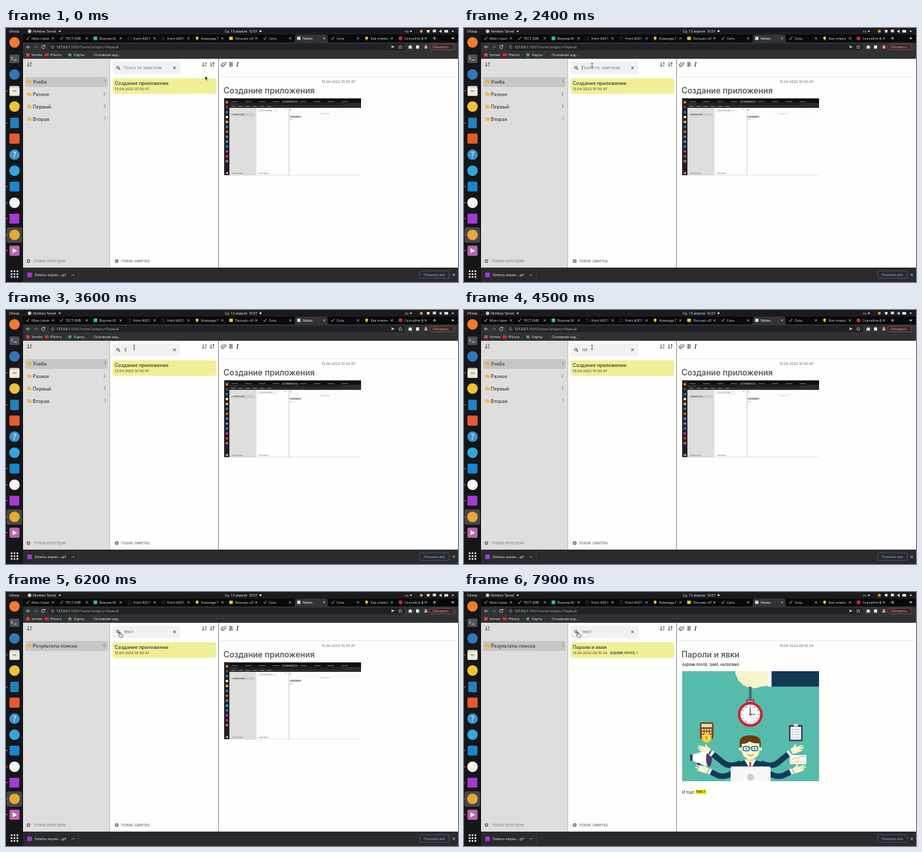
An HTML page for the animation above (8 s loop, 690 by 388 pixels).

```html
<!DOCTYPE html>
<html lang="ru">
<head>
<meta charset="utf-8">
<title>Notes</title>
<style>
html, body { margin: 0; width: 100%; height: 100%; overflow: hidden; background: #1b1b1d; }
svg { display: block; width: 100vw; height: 100vh; }
text { white-space: pre; }
.app { font-family: Inter, "Noto Sans", sans-serif; }
.ui { font-family: "Noto Sans", "Open Sans", sans-serif; }
</style>
</head>
<body>
<svg id="stage" viewBox="0 0 690 388"></svg>
<script>
const LOOP = 8000;
const rect = (x, y, w, h, fill, r = 0, extra = '') =>
  `<rect x="${x}" y="${y}" width="${w}" height="${h}" rx="${r}" fill="${fill}" ${extra}/>`;
const circle = (x, y, r, fill, extra = '') => `<circle cx="${x}" cy="${y}" r="${r}" fill="${fill}" ${extra}/>`;
const shape = (d, fill, extra = '') => `<path d="${d}" fill="${fill}" ${extra}/>`;
const line = (d, color, w = 1, cap = 'round') =>
  `<path d="${d}" fill="none" stroke="${color}" stroke-width="${w}" stroke-linecap="${cap}" stroke-linejoin="round"/>`;
// y is the middle of the capitals
const label = (cls, x, y, size, fill, str, extra = '') =>
  `<text class="${cls}" x="${x}" y="${(y + size * .36).toFixed(2)}" font-size="${size}" fill="${fill}" ${extra}>${str}</text>`;
const app = (...a) => label('app', ...a);
const ui = (...a) => label('ui', ...a);
const group = (id, body) => `<g id="${id}">${body}</g>`;
const cross = (x, y, r, color, w) => line(`M${x - r} ${y - r}l${2 * r} ${2 * r}m0 ${-2 * r}l${-2 * r} ${2 * r}`, color, w);
const SEMI = 'font-weight="600"', MID = 'text-anchor="middle"', END = 'text-anchor="end"';

function topBar() {
  return rect(0, 0, 690, 10, '#1b1b1d') + ui(4.5, 5, 5.2, '#e4e4e4', 'Обзор') +
    circle(36, 5, 2.7, '#c9c9c9') + ui(41, 5, 5.3, '#e4e4e4', 'Nimbex Tarvel') +
    shape('M80 4h4l-2 2.4z', '#ddd') + ui(334, 5, 5.1, '#e8e8e8', 'Ср, 13 апреля  10:57') +
    circle(388.5, 4.8, 1.5, '#eee') + ui(609, 5, 5.2, '#ddd', 'ru') + shape('M616 4h4l-2 2.4z', '#ddd') +
    circle(634, 5, 2.3, '#e9902c') + shape('M642 3h5l-1 4h-3z', '#ddd') + rect(651.5, 2.5, 5, 4, '#ddd', .6) +
    shape('M661.5 4h1.5l2-2v6l-2-2h-1.5z', '#ddd') + rect(669, 3, 6, 4, '#ddd', .7) + shape('M680 4h4l-2 2.4z', '#ddd');
}

function tabs() {
  const names = ['Моя стран', 'ТЕСТ (МВ', 'Ворлик.М', 'front #201', 'front #201', 'Команда Г', 'Письмо «И',
    'Сеть', 'Notes', 'Сеть', 'Как отмен', 'Скачайте ф'];
  const kinds = 'vvsoobmvnvbr';
  const icons = {
    v: x => line(`M${x - 2} 16l1.5 1.7l2.5-4`, '#cfd2d6', .8),
    s: x => rect(x - 2.8, 13, 5.6, 5.6, '#27c3a0', .6),
    o: x => circle(x, 15.8, 2.4, 'none', 'stroke="#45484c" stroke-width=".7"'),
    b: x => circle(x, 15.2, 2.2, '#f5c43a') + rect(x - 1, 17, 2, 1.6, '#d9a42c'),
    m: x => rect(x - 2.8, 13.2, 5.6, 5, '#f4c531', .4),
    n: x => rect(x - 2.5, 13.2, 5, 5, '#c9dff5', .4),
    r: x => circle(x, 15.8, 3, '#d02637')
  };
  let out = rect(26, 10, 664, 12, '#08090a') + shape('M438 22q3 0 3-3v-6q0-3 3-3h44q3 0 3 3v6q0 3 3 3z', '#323336');
  names.forEach((name, i) => {
    const x = 33 + i * 51.75;
    out += icons[kinds[i]](x) + ui(x + 6, 15.8, 5.3, i === 8 ? '#fff' : '#c9ccd1', name) +
      cross(x + 38.6, 15.8, 1.35, '#d5d7da', .75);
  });
  return out + line('M652 15.8h4.4m-2.2-2.2v4.4', '#e6e6e6', .8) + shape('M679.5 14.8h5l-2.5 2.8z', '#ddd');
}

function toolbar() {
  return rect(26, 22, 664, 25, '#303134') + rect(65, 24, 544, 10, '#202124', 5) +
    line('M36.5 29h-5m2.2-2.2l-2.2 2.2l2.2 2.2', '#e4e4e4', .8) + line('M43 29h5m-2.2-2.2l2.2 2.2l-2.2 2.2', '#7b7d80', .8) +
    line('M59 27.5a2.5 2.5 0 1 0 .3 2.3m-.2-3.6v1.6h-1.6', '#e4e4e4', .8) +
    circle(71, 29, 2.3, 'none', 'stroke="#b6b8bb" stroke-width=".6"') + line('M71 28.7v1.3', '#b6b8bb', .6) +
    ui(77, 28.7, 5, '#9aa0a6', '<tspan fill="#f0f0f0">127.0.0.1</tspan>:5500/?nameCategory=Первый') +
    shape('M588 26.5l5.5 2.3l-5.5 2.3l1-2.3z', '#ccc') +
    shape('M602 26l.9 2h2l-1.6 1.3l.7 2.1l-2-1.2l-2 1.2l.7-2.1l-1.6-1.3h2z', 'none', 'stroke="#ccc" stroke-width=".6"') +
    shape('M614.5 27.3h1.6a1 1 0 0 1 2 0h1.6v4.2h-5.2z', '#ddd') + rect(626, 26.5, 4.6, 5, '#eee', .6) +
    circle(641, 29, 3.2, '#784a42') + circle(641, 27.8, 1.2, '#e2c1ae') + shape('M638.8 31a2.2 2 0 0 1 4.4 0z', '#e2c1ae') +
    rect(646.7, 24.7, 40, 8.6, '#35292b', 4.3, 'stroke="#b95b56" stroke-width=".6"') +
    ui(651, 28.8, 5.1, '#f28b82', 'Обновить') + [27, 29, 31].map(y => circle(683, y, .5, '#f28b82')).join('') +
    rect(31, 38.5, 5, 5, '#dc4438', .5) + ui(39, 41, 5.2, '#e0e0e0', 'Vomex') +
    rect(59, 38.7, 6.4, 4.6, '#e12a25', 1) + ui(68, 41, 5.2, '#e0e0e0', 'Plivora') +
    circle(97.5, 41, 2.6, '#3aa757') + ui(104, 41, 5.2, '#e0e0e0', 'Карты') + ui(134, 41, 5.4, '#e0e0e0', 'Основная зад…');
}

function dock() {
  const dots = [96, 145, 242, 267, 291, 316, 340];
  return rect(0, 10, 26, 378, '#151618') + rect(1, 304.5, 23.5, 23.5, '#46484c', 3) +
    circle(13, 22, 8, '#f57a2c') +
    rect(5.5, 40.5, 15, 13, '#4a5259', 1.5) + line('M8 44l2.3 2l-2.3 2m4 1h4', '#e4e8ea', .9) +
    circle(13, 71, 8, '#2f78bb') +
    rect(5.5, 88.5, 15, 15, '#d8d2c4', 1.5) + rect(5.5, 91, 15, 12.5, '#f1ece0', 1.5) + rect(10, 95, 6, 2.5, '#b6aa94', .6) +
    circle(13, 120, 8, '#f0c332') + rect(6.5, 137, 13, 16, '#2182bd', 1) +
    rect(5.2, 161.2, 15.6, 15.6, '#e95a2b', 2) +
    circle(13, 193.5, 8, '#3e93ce') + ui(13, 193.5, 12, '#fff', '?', MID) +
    circle(13, 218, 8, '#32a6dc') + rect(5.5, 234.7, 15, 15, '#1787d0', 2) +
    circle(13, 267, 8, '#f6f4f4') + rect(5.3, 283.7, 15, 15, '#a43ad5', 1) +
    circle(13, 316, 8, '#e6a932') +
    rect(5.3, 332.5, 15.4, 15.4, '#b964ae', 2) + shape('M10 336.5l7 3.8l-7 3.8z', '#fff') +
    dots.map(y => circle(1.5, y, 1, '#e95420')).join('') +
    [0, 1, 2].map(r => [0, 1, 2].map(c => rect(7.3 + c * 4.4, 370.3 + r * 4.4, 2.5, 2.5, '#f1f1f1', .5)).join('')).join('');
}

function downloads() {
  return rect(26, 366, 664, 22, '#292a2d') + rect(32.5, 373.5, 7, 7, '#a43ad5', .5) +
    ui(43.5, 377, 5.4, '#e4e4e4', 'Запись-экран….gif') + line('M100.5 378l1.8-1.8l1.8 1.8', '#c9c9c9', .8) +
    rect(110.2, 369, .6, 16, '#4b4c50') + rect(631.5, 371, 45, 11.5, 'none', 1.5, 'stroke="#666a70" stroke-width=".6"') +
    ui(654, 376.8, 5, '#8ab4f8', 'Показать все', MID) + cross(683.5, 377, 1.5, '#ddd', .8);
}

const sortIcon = (x, letters) => line(`M${x - 2} 52.5v6m-1.4-1.6l1.4 1.6l1.4-1.6`, '#444', .9) +
  (letters ? app(x + .4, 53.4, 4, '#444', 'A', SEMI) + app(x + .4, 57.6, 4, '#444', 'Z', SEMI)
    : line(`M${x + 1.8} 58.5v-6m-1.4 1.6l1.4-1.6l1.4 1.6`, '#444', .9));
const plus = (x, y, color) => circle(x, y, 2.7, color) + line(`M${x - 1.5} ${y}h3m-1.5-1.5v3`, '#f4f4f4', .8);
const category = (y, name, count, extra = '') =>
  shape(`M32.5 ${y - 2}q0-.6.6-.6h2l.8.9h2.4v1h-4.6l-1.2 3z`, '#e9a71c') + shape(`M34 ${y - .3}h6l-1.5 2.9h-6z`, '#f6b91f') +
  app(41, y, 7.1, '#4a4a4a', name, SEMI) + app(152, y, 5.8, '#666', count, END + extra);

function layout() {
  return rect(26, 47, 132.7, 319, '#dededd') + rect(158.7, 47, 531.3, 319, '#fefefd') + rect(324, 47, 1, 319, '#8d8d8d') +
    rect(29, 75, 126.5, 15, '#c6c6c5', 3) + sortIcon(36, true) + sortIcon(303, true) + sortIcon(315, false) +
    plus(34.2, 356, '#555') + app(43, 356, 5.9, '#858585', 'Новая категория') +
    plus(169, 356, '#555') + app(176, 356, 5.9, '#666', 'Новая заметка') +
    line('M334.5 54.5l-2.8 2.8a1 1 0 0 1-1.5-1.5l3-3a1.8 1.8 0 0 1 2.5 2.5l-3.4 3.4a2.6 2.6 0 0 1-3.6-3.6l2.4-2.4', '#444', .9) +
    `<text x="340.5" y="58.8" font-family="Noto Serif, serif" font-size="8.6" font-weight="700" fill="#444">B</text>` +
    `<text x="351.5" y="58.8" font-family="Noto Serif, serif" font-size="8.6" font-style="italic" font-weight="600" fill="#444">I</text>` +
    rect(328, 74, 359, .7, '#dcdcdc') + rect(162.8, 76.8, 158, 24, '#f1ef95', 4) +
    rect(162.8, 51.2, 103.2, 19.5, '#f1f1f0', 3) +
    circle(170.7, 60.3, 1.8, 'none', 'stroke="#333" stroke-width="1"') + line('M172.2 61.8l1.6 1.6', '#333', 1.1) +
    cross(257.2, 60.9, 1.5, '#333', 1);
}

const note = (title, date) => app(166, 84.2, 7.2, '#4d4a38', title, SEMI) + app(166, 93.2, 5.4, '#5b583f', date, 'font-weight="500"') +
  app(507.5, 81.8, 5.4, '#666', date, MID) + app(332, 96, 12.4, '#4a4a4a', title, 'font-weight="500"');

function screenshot() {
  let out = rect(333, 107.5, 209, 117.5, '#fdfdfd') + rect(333, 107.5, 209, 14.5, '#0d0e10') + rect(333, 107.5, 8.3, 117.5, '#241d22') +
    rect(341.3, 122, 40.5, 103, '#dededd') + rect(431.7, 122, .5, 103, '#999') + rect(381.8, 122, .4, 103, '#ccc') +
    rect(421, 111, 25, 3, '#46474b', .8) + rect(341.3, 114.3, 200.7, 7.5, '#2b2c2f') + rect(354, 115, 160, 3, '#1d1e21', 1.5);
  for (let i = 0; i < 9; i++) out += rect(344 + i * 21, 112, 10, .8, '#8a8c90');
  for (let i = 0; i < 6; i++) out += rect(344 + i * 11, 119.5, 6, .7, '#aaa');
  ['#f57a2c', '#4a5259', '#2f78bb', '#f1ece0', '#f0c332', '#2182bd', '#e95a2b', '#3e93ce', '#32a6dc', '#1787d0', '#a43ad5', '#ec2836', '#b964ae']
    .forEach((c, i) => { out += circle(337.2, 113.5 + i * 7.5, 2.1, c); });
  for (let i = 0; i < 3; i++) out += rect(335.6 + i * 1.3, 220, .8, 3, '#ddd');
  return out + rect(343, 130.4, 37, 4, '#cbcbca', .7) + app(346, 132.4, 2.1, '#555', 'Новая категория', SEMI) +
    rect(383.5, 124, 31, 5, '#f1f1f0', .8) + app(387, 126.4, 2, '#888', 'Поиск по заметкам') +
    app(425, 124.5, 2.4, '#555', '↓↑') + app(433.5, 124.6, 2.6, '#444', 'B', SEMI) +
    rect(432, 128.5, 109, .3, '#ddd') + app(487, 131, 1.8, '#888', '13.04.2022 10:40', MID) +
    app(433, 135.4, 3.7, '#444', 'Название', SEMI) + app(433, 140, 2, '#888', 'Текст') +
    app(343, 222.3, 2, '#666', '+ Новая категория') + app(384, 222.3, 2, '#666', '+ Новая заметка') +
    rect(333, 224.7, 209, .4, '#bbb');
}

function illustration() {
  const skin = '#fbf3cb', shade = '#e9dfa9', navy = '#123a57', ink = '#28323a', red = '#d3202f', purple = '#4c3a70';
  const hand = (x, y) => shape(`M${x + 4} ${y - 3}q-3-3-5-3q-1-4-4-5q0 3 1 5q-5-2-11-3l-1 1l6 3l-7-1l0 1.5l7 2.5l-5 0l1 1.5q7 3 14 5z`, skin);
  // one side of arms, mirrored for the other
  const arms = line('M422 261q-17 8-27-1l-16-13', navy, 8.5, 'butt') + line('M416 273q-17 12-29 7l-12-6', navy, 8.5, 'butt') +
    line('M380 248l-3-2.5M377 275l-3.5-1.6', '#fff', 9, 'butt') + hand(373, 243) + hand(370, 273);
  let out = rect(333, 121, 209, 168, '#55bbaa') +
    shape('M414 121h52v22q-12 1-18 3q-7 3-11-2q-4 3-8-1q-4 0-6-5q-5-1-5-6q-4-5-4-11z', skin) +
    line('M421 133q8 1 12-3m-8 8q8 1 12-4m-5 8q7 0 9-5', shade, .8) +
    rect(464, 121, 6, 23.5, '#f6f8fa') + rect(469.5, 121, 72.5, 23.5, navy);
  for (let i = 0; i < 5; i++) out += rect(435.8, 145 + i * 4, 2.6, 4, 'none', 1.3, `stroke="${ink}" stroke-width="1"`);
  out += rect(431.5, 164.5, 11, 7, 'none', 1.5, `stroke="${red}" stroke-width="1.8"`) +
    circle(437, 187, 17, '#fff', `stroke="${red}" stroke-width="4"`);
  for (let a = 0; a < 360; a += 30) out += rect(436.6, 173, .8, 2.4, ink, 0, `transform="rotate(${a} 437 187)"`);
  out += line('M437 177v10h7', ink, 1.2) + circle(437, 187, 1.8, red) +
    rect(360, 199, 21, 25, '#7d4a20', 2) + rect(362.5, 201.5, 16, 5, '#f0dfbc');
  for (let i = 0; i < 12; i++) out += rect(363 + i % 4 * 4, 209 + (i / 4 | 0) * 4.5, 3, 2.8, '#ecc99a');
  out += circle(370.5, 223, 7.5, '#efc028') + circle(370.5, 223, 5.6, '#fbe056') + app(370.5, 223, 7, '#b98a17', '$', SEMI + ' ' + MID) +
    rect(496, 203, 21, 25, purple, 1.5) + rect(498.5, 206, 16, 19.5, '#fff') + rect(503, 201.5, 7, 4, '#dddde2', 1);
  for (let i = 0; i < 4; i++) out += rect(500.5, 209 + i * 4, 1.7, 1.7, '#4faf9f') + rect(504, 209.4 + i * 4, 8, .9, '#8d96a2');
  out += rect(497.5, 249, 25, 14, '#f8fafb', .6);
  for (let i = 0; i < 5; i++) out += rect(500.5 + i * 4.3, 259 - i % 3, 2, 2 + i % 3, '#e9cf6a');
  out += line('M500 257l5-4l4 2l5-4l6 0', '#d9a62c', .9) +
    rect(345, 248, 5, 10, purple, 1) + rect(356, 258, 5, 10, purple, 1) +
    shape('M349 248l23-6v24l-23-8z', '#fff') + `<ellipse cx="374" cy="254" rx="4.5" ry="13" fill="${purple}"/>` +
    arms + `<g transform="matrix(-1 0 0 1 875 0)">${arms}</g>` +
    shape('M409 289v-17q0-11 16-14l12-3l12 3q16 3 16 14v17z', navy) + shape('M428 256h18l-9 16z', '#fff') +
    rect(431.5, 246, 11, 13, shade, 4) + shape('M435 260h4l-1 3l2 7h-6l2-7z', red) +
    shape('M421 234q-3-15 16-15q18 0 16 15l-1 6h-30z', '#693c12') +
    circle(422.5, 240, 2.7, skin) + circle(452, 240, 2.7, skin) +
    shape('M424 232q8 0 12-4q6 4 15 3v10q0 13-13.8 14q-13.2-1-13.2-14z', skin) +
    [426, 439].map(x => rect(x, 236, 9.5, 6.5, '#dff3ee', 2.4, 'stroke="#176b78" stroke-width="1.4"')).join('') +
    line('M435.5 238h3.5', '#176b78', 1.2) +
    circle(431, 239.2, 1, ink) + circle(443.5, 239.2, 1, ink) + line('M433 248.5q4.5 3 9 0', '#a64f42', 1) +
    shape('M407 289v-20q0-2.5 2.5-2.5h56q2.5 0 2.5 2.5v20z', '#f6f7f7') + circle(437.5, 283, 5, '#c9cccb');
  return out;
}

function dropdown() {
  const words = ['первая', 'привет', 're', 'первый', 'jfd', 'krjefnfejnjfn'];
  return rect(161.8, 71.5, 104.8, 84, '#0002', 1.5) + rect(162.2, 71, 103.9, 83.8, '#fff', 1) +
    words.map((w, i) => ui(166.2, 80.7 + i * 12.95, 5.6, '#222', w, 'font-weight="500"')).join('');
}

const folders = [['Учеба', 1], ['Разное', 2], ['Первый', 3], ['Вторая', 1]];
const stage = document.getElementById('stage');
stage.innerHTML = layout() +
  group('folders', folders.map(([name, n], i) => category(82 + i * 19, name, n)).join('')) +
  group('results', category(82, 'Результаты поиска', 0, ' id="count"')) +
  group('oldNote', note('Создание приложения', '13.04.2022 10:50:47') + screenshot()) +
  group('newNote', note('Пароли и явки', '13.04.2022 09:15:29') +
    app(223, 93.2, 5.5, '#4d4a38', 'ворлик.почта, г', SEMI + ' font-style="italic"') +
    app(333, 110.7, 5.6, '#444', '<tspan font-style="italic">ворлик.почта</tspan>, зумб, насвязике', SEMI) + illustration() +
    rect(353.3, 302, 16.2, 7.2, '#f5f51a') + app(333, 305.5, 6.1, '#333', 'И еще') + app(354, 305.5, 5.5, '#333', 'текст', SEMI)) +
  app(180, 60.9, 6.1, '#858585', '', 'id="query"') + rect(0, 57, .6, 7.5, '#333', 0, 'id="caret"') + group('menu', dropdown()) +
  topBar() + tabs() + toolbar() + dock() + downloads() +
  group('arrow', shape('M0 0v6l1.5-1.3l1 2.2l1-.5l-1-2.1h2z', '#111', 'stroke="#fff" stroke-width=".4"')) +
  group('beam', line('M-1.2-3h2.4m-1.2 0v6m-1.2 0h2.4', '#333', .7)) +
  group('hand', shape('M-1.2-.5v-3q0-1 .8-1t.8 1v2l2.4.6q1 .3.9 1.3l-.5 2.8h-4l-2.2-2.7q-.5-1 .5-1z', '#fff', 'stroke="#222" stroke-width=".7"'));

const $ = id => document.getElementById(id);
const show = (id, on) => $(id).setAttribute('display', on ? 'inline' : 'none');
const within = (t, a, b) => t >= a && t < b;
const keys = [3500, 3700, 3900, 4600, 4700];
const blinks = [[2400, 2900], [3400, 4500], [4600, 5200], [5700, 6000]];
const ease = p => p * p * (3 - 2 * p);
const progress = (t, a, b) => ease(Math.min(1, Math.max(0, (t - a) / (b - a))));

function pointer(t) {
  const p = progress(t, 1650, 2200), q = progress(t, 5150, 6000);
  return [304 - 108.5 * p - 21 * q, 73.5 - 16.5 * p + 8.8 * q];
}

function render(t) {
  const typed = 'текст'.slice(0, keys.filter(k => t >= k).length);
  const query = $('query');
  query.textContent = typed || 'Поиск по заметкам';
  query.setAttribute('font-size', typed ? 5.7 : 6.1);
  query.setAttribute('fill', typed ? '#666' : '#858585');
  $('caret').setAttribute('x', 180 + (typed ? query.getComputedTextLength() : 0));
  show('caret', blinks.some(([a, b]) => within(t, a, b)));
  show('menu', within(t, 2900, 3400));
  show('folders', t < 6100);
  show('results', t >= 6100);
  show('oldNote', t < 6300);
  show('newNote', t >= 6300);
  $('count').textContent = t < 6300 ? 0 : 1;
  const [x, y] = pointer(t);
  const kind = x < 176 ? 'hand' : x < 266 && y < 71 ? 'beam' : 'arrow';
  for (const id of ['arrow', 'beam', 'hand']) {
    show(id, id === kind);
    $(id).setAttribute('transform', `translate(${x.toFixed(2)} ${y.toFixed(2)})`);
  }
}

function tick() {
  render(performance.now() % LOOP);
  requestAnimationFrame(tick);
}
tick();
</script>
</body>
</html>
```
